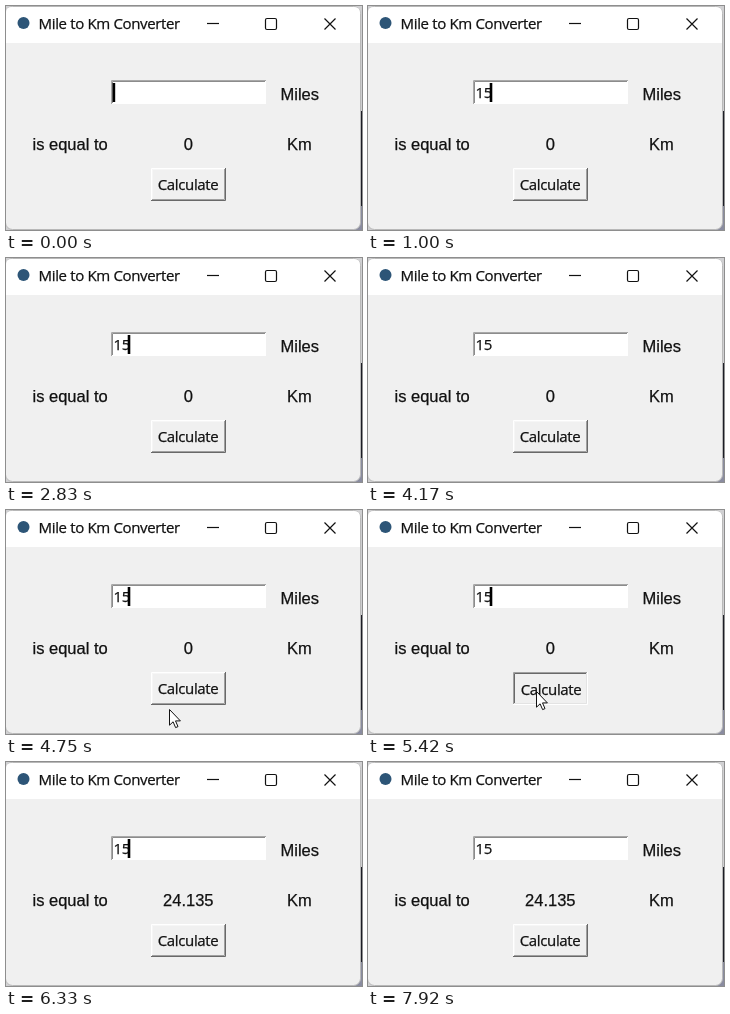
An HTML page for the animation above (8000 ms loop, 356 by 224 pixels).

```html
<!DOCTYPE html>
<html lang="en">
<head>
<meta charset="utf-8">
<title>Mile to Km Converter</title>
<style>
  html, body { margin: 0; width: 100%; height: 100%; overflow: hidden; background: #f0f0f0; }
  svg { display: block; width: 356px; height: 224px; }
  text { fill: #111; stroke: #111; stroke-width: .25px; white-space: pre; }
  .ui { font: 15px "Open Sans", "Noto Sans", sans-serif; letter-spacing: -.35px; }
  .label { font: 16.5px "Liberation Sans", Arial, sans-serif; }
</style>
</head>
<body>
<svg viewBox="0 0 356 224">
  <!-- what lies behind the window -->
  <rect width="356" height="224" fill="#d0d0d2"/>
  <rect x="346" y="105" width="10" height="95" fill="#1c1d26"/>
  <rect x="346" y="200" width="10" height="24" fill="#8a8ca0"/>

  <!-- window with title bar -->
  <rect x="-.5" y=".5" width="355" height="223" rx="7" fill="#f0f0f0" stroke="#b8b8b8"/>
  <path d="M0 37V6Q0 1 6 1H348Q354 1 354 7V37Z" fill="#fff"/>
  <circle cx="17.5" cy="17" r="6" fill="#2d5577"/>
  <text class="ui" x="32.5" y="23">Mile to Km Converter</text>
  <g fill="none" stroke="#111" stroke-width="1.2">
    <path d="M201 17.5H213"/>
    <rect x="259.5" y="12.5" width="11" height="11" rx="1.5"/>
    <path d="M318.5 12.5l11 11m0 -11l-11 11"/>
  </g>

  <!-- entry -->
  <rect x="105" y="74" width="155" height="24" fill="#fff"/>
  <path d="M105.5 98V74.5H260" fill="none" stroke="#a8a8a8"/>
  <path d="M106.5 97V75.5H259" fill="none" stroke="#8c8c8c"/>
  <text id="entry" class="ui" x="107.5" y="92"></text>
  <rect id="caret" y="77" width="2.6" height="19" fill="#000"/>

  <text class="label" x="274.5" y="94">Miles</text>
  <text class="label" x="26.5" y="144">is equal to</text>
  <text id="result" class="label" x="182.3" y="144" text-anchor="middle"></text>
  <text class="label" x="281" y="144">Km</text>

  <!-- button -->
  <g fill="none">
    <path id="lightOuter" d="M145.5 195V162.5H220"/>
    <path id="lightInner" d="M146.5 194V163.5H219"/>
    <path id="darkOuter" d="M145 194.5H219.5V162"/>
    <path id="darkInner" d="M146 193.5H218.5V163"/>
  </g>
  <text id="caption" class="ui" x="151.7" y="184">Calculate</text>

  <path id="pointer" d="M.5 .5V16.2L4.1 12.8L6.6 18.6L9 17.6L6.5 11.9H11.4Z"
        fill="#fff" stroke="#111" stroke-linejoin="round"/>
</svg>
<script>
  const LOOP = 8000;
  const BLINK = 916.6, FIRST_OFF = 500, OFF_TIME = 250;
  const TYPE_ONE = 420, TYPE_FIVE = 665;
  const PRESS = 5245, RELEASE = 5580;
  const PATH = [[4745, 163, 199], [4830, 166, 190], [4915, 168, 185], [5080, 168, 181]];
  const POINTER_END = 5745;

  const el = id => document.getElementById(id);
  const set = (id, attrs) => {
    for (const name in attrs) el(id).setAttribute(name, attrs[name]);
  };
  const show = (id, on) => set(id, { visibility: on ? "visible" : "hidden" });

  function drawEntry(t) {
    const typed = t < TYPE_ONE ? "" : t < TYPE_FIVE ? "1" : "15";
    el("entry").textContent = typed;
    set("caret", { x: [106.6, 114, 121.7][typed.length] });
    const phase = (t - FIRST_OFF + BLINK) % BLINK;
    show("caret", t < FIRST_OFF || phase >= OFF_TIME);
  }

  function drawButton(pressed) {
    const [lightOuter, lightInner, darkOuter, darkInner] = pressed
      ? ["#a0a0a0", "#696969", "#fff", "#e3e3e3"]
      : ["#fff", "#f6f6f6", "#696969", "#a0a0a0"];
    Object.entries({ lightOuter, lightInner, darkOuter, darkInner })
      .forEach(([id, stroke]) => set(id, { stroke }));
    set("caption", { transform: pressed ? "translate(1 1)" : "" });
  }

  function drawPointer(t) {
    const visible = t >= PATH[0][0] && t < POINTER_END;
    show("pointer", visible);
    if (!visible) return;
    const [, x, y] = PATH.filter(p => p[0] <= t).pop();
    set("pointer", { transform: `translate(${x} ${y})` });
  }

  function draw(t) {
    drawEntry(t);
    el("result").textContent = t < RELEASE ? "0" : "24.135";
    drawButton(t >= PRESS && t < RELEASE);
    drawPointer(t);
  }

  const start = performance.now();
  function tick() {
    draw((performance.now() - start) % LOOP);
    requestAnimationFrame(tick);
  }
  tick();
</script>
</body>
</html>
```
